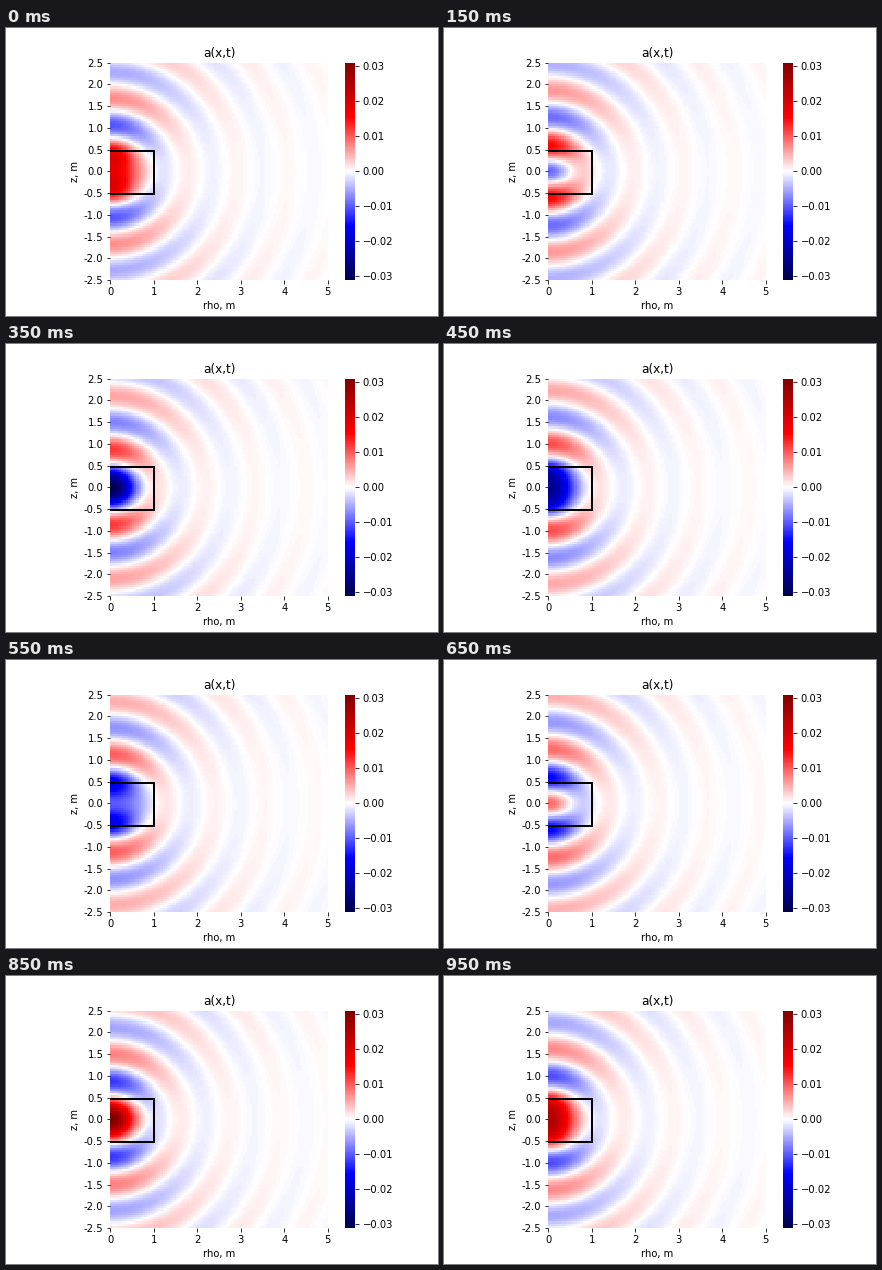
Recreate the animation shown at these times as a matplotlib script. Size 432 by 288 pixels, loop 1000 ms.

```python
import numpy as np
import matplotlib.pyplot as plt
from matplotlib.animation import FuncAnimation
from matplotlib.cm import ScalarMappable
from matplotlib.colors import Normalize

W, H, DPI = 432, 288, 72
FRAMES, INTERVAL = 20, 50
PEAK = 0.031
STEP = 0.05                      # grid cell, metres

# Two cavity modes (TM010 and TE011) drive a massive field at the sum frequency.
X1, X2, MASS = 2.4048, 3.8317, 5.0
OMEGA2 = np.hypot(X2, np.pi)
K = np.sqrt((X1 + OMEGA2) ** 2 - MASS ** 2)


def bessel(n, x):
    tau = (np.arange(200) + 0.5) * np.pi / 200
    return np.cos(n * tau - np.multiply.outer(x, np.sin(tau))).mean(axis=-1)


def centres(start, count):
    return (start + np.arange(count) + 0.5) * STEP


def complex_field():
    """Retarded field of the cavity source on the (z, rho) grid."""
    rho, src = centres(0, 100), centres(0, 20)
    dz = np.arange(60) * STEP
    cos_phi = np.cos((np.arange(48) + 0.5) * np.pi / 48)
    profile = (bessel(0, X1 * src) * bessel(0, X2 * src)
               + OMEGA2 / X2 * bessel(1, X1 * src) * bessel(1, X2 * src))

    kernel = np.zeros((60, 100), complex)
    for s, weight in zip(src, profile * src):
        flat = rho[:, None] ** 2 + s ** 2 - 2 * s * rho[:, None] * cos_phi
        r = np.sqrt(dz[:, None, None] ** 2 + flat + 0.02 ** 2)
        kernel += weight * (np.exp(1j * K * r) / r).mean(axis=-1)

    upper = np.zeros((50, 100), complex)
    row = np.arange(50)
    for j, z in zip(range(-10, 10), centres(-10, 20)):
        upper += np.cos(np.pi * z) * kernel[abs(row - j)]
    field = np.vstack([upper[::-1], upper])
    return -PEAK * field / abs(field).max()


def box(left, top, width, height):
    return [left / W, 1 - (top + height) / H, width / W, height / H]


FIELD = complex_field()


def snapshot(i):
    return (FIELD * np.exp(-2j * np.pi * i / FRAMES)).real


plt.rcParams.update({"font.family": "DejaVu Sans", "font.size": 10})
fig = plt.figure(figsize=(W / DPI, H / DPI), dpi=DPI, facecolor="white")
SIDE = 217.44
ax = fig.add_axes(box(104.4, 34.56, SIDE, SIDE))
cax = fig.add_axes(box(338.58, 34.56, SIDE / 20, SIDE))

norm = Normalize(-PEAK, PEAK)
mesh = ax.pcolormesh(np.linspace(0, 5, 101), np.linspace(-2.5, 2.5, 101),
                     snapshot(0), cmap="seismic", norm=norm)
ax.plot([0, 1, 1, 0], [0.475, 0.475, -0.525, -0.525], color="black", lw=2,
        solid_joinstyle="miter", solid_capstyle="butt")

z_ticks = np.arange(-2.5, 2.6, 0.5)
ax.set(xlim=(0, 5), ylim=(-2.5, 2.5), xticks=range(6),
       xlabel="rho, m", ylabel="z, m")
ax.set_yticks(z_ticks, [f"{z:.1f}" for z in z_ticks])
ax.set_title("a(x,t)", fontsize=12)
ax.spines[:].set_visible(False)

bar = fig.colorbar(ScalarMappable(norm, "seismic"), cax=cax,
                   ticks=np.arange(-3, 4) / 100)
bar.outline.set_visible(False)


def update(i):
    mesh.set_array(snapshot(i))
    return [mesh]


anim = FuncAnimation(fig, update, frames=FRAMES, interval=INTERVAL,
                     repeat=True, repeat_delay=0, blit=False)
plt.show()
```
